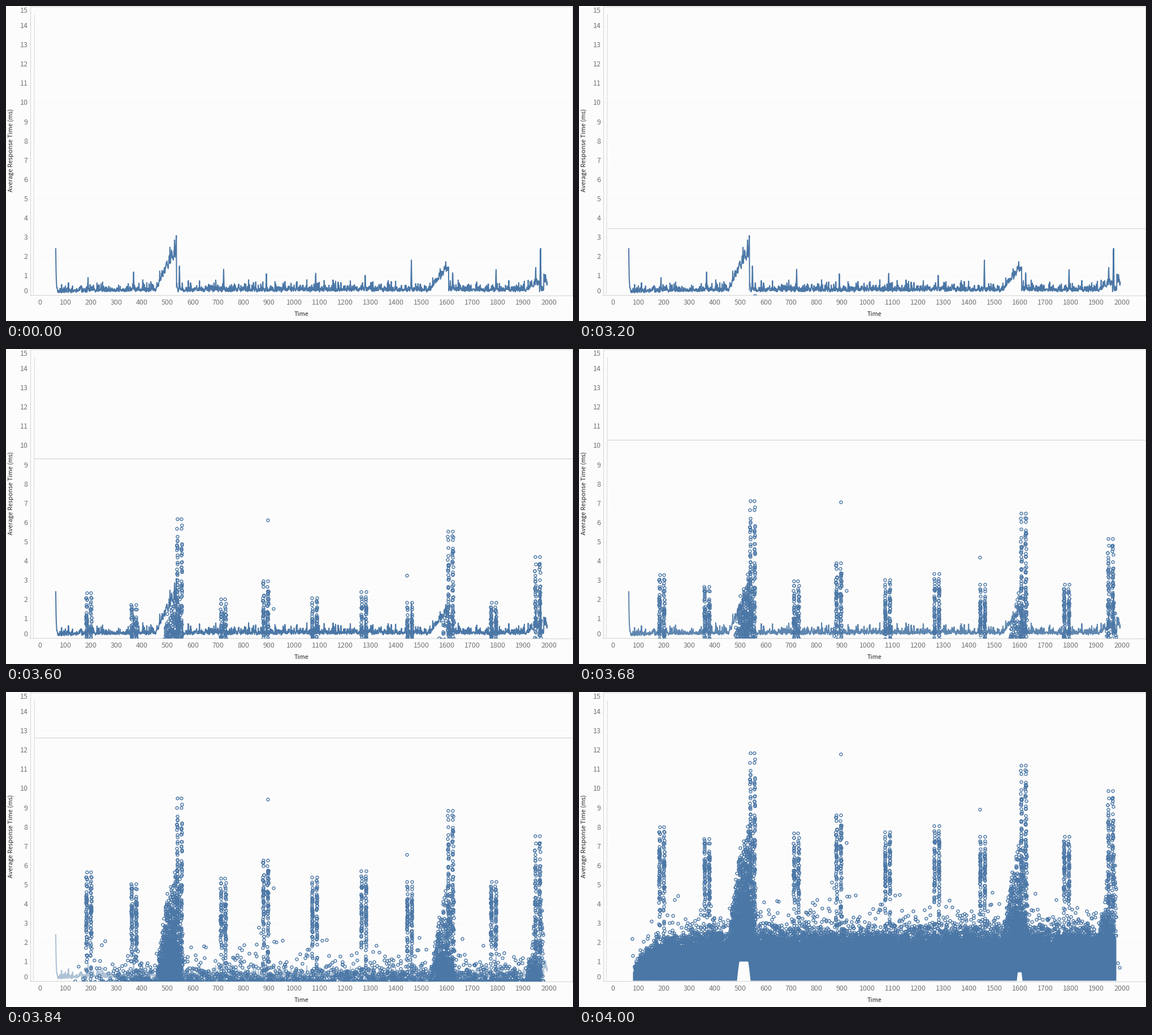
A matplotlib script that plays this animation: 1003x558 px, repeating every 7.04 s.

```python
import numpy as np
import matplotlib.pyplot as plt
from matplotlib.animation import FuncAnimation
from matplotlib.patches import Rectangle
from matplotlib.transforms import Affine2D

W, H, DPI = 1003, 558, 64
STEP, LOOP = 40, 7040
START = 2960 // STEP
BLUE = "#4b77a6"
RULE = "#d2d2d2"
ZERO, UNIT = 512.0, 34.12
LEFT, RIGHT, FOOT = 95, 950, 511
rng = np.random.default_rng(7)


def pt(px):
    return px * 72 / DPI


def ypx(value):
    return ZERO - UNIT * np.asarray(value)


def span(x, a, b):
    """Position of x between a and b, kept within 0..1."""
    return np.clip((x - a) / (b - a), 0, 1)


def settle(x, width):
    return 1 - np.exp(-(x - LEFT) / width)


fig = plt.figure(figsize=(W / DPI, H / DPI), dpi=DPI, facecolor="#fcfcfc")
ax = fig.add_axes([0, 0, 1, 1])
ax.set(xlim=(0, W), ylim=(H, 0))
ax.axis("off")


def rule(x, y, color=RULE, width=1, **kw):
    return ax.plot(x, y, color=color, lw=pt(width), **kw)[0]


def label(x, y, text, size=12.5, color="#757575", ha="center", **kw):
    ax.text(x, y, text, fontsize=pt(size), color=color, ha=ha, va="baseline",
            family="Noto Sans CJK JP", **kw)


# Axes
for v in range(16):
    y = float(ypx(v))
    if 0 < v < 15:
        rule([44, W], [y, y], "#f8f8f8")
    label(38.5, np.clip(y, 7.5, 504.5) + 4.6, str(v), ha="right")
for v in range(0, 2001, 100):
    label(60.3 + 0.45 * v, 529, str(v))
label(522.5, 549, "Time", 11, "#262626")
label(12.3, 255, "Average Response Time (ms)", 11, "#262626",
      rotation=90, rotation_mode="anchor")
rule([43.5, 43.5], [0, 513])
rule([43, W], [0.5, 0.5])
rule([1002.5, 1002.5], [0, 514])
rule([43, W], [512.5, 513.3])
rule([50.5, 48.5], [15, 510], "#d9d9d9")

# Bursts: x, top of the raw samples, peak of the average
bursts = [(142, 239, 1.05), (222, 260, 1.25), (302.5, 108, 1.65),
          (380, 250, 1.4), (455, 218, 1.1), (541.5, 248, 1.3),
          (628.5, 237, 1.25), (709.5, 256, 1.9), (782, 130, 1.4),
          (858, 256, 1.45), (936, 175, 2.95)]
# Surges: from, to, average level, body height, cloud height, samples
surges = [(264, 312, 2.0, 62, 195, 520), (748, 793, 1.1, 42, 185, 260),
          (918, 951, 0.4, 24, 170, 110)]

# Averaged series
sx = np.arange(88, 957.6, 0.45)
level = 0.17 - 0.09 * np.exp(-(sx - 88) / 50) + 2 * np.exp(-(sx - 88) / 0.9)
for a, b, high, *_ in surges:
    end = a + 0.78 * (b - a)
    level += np.where(sx < end, high * span(sx, a + 2, end) ** 0.8, 0)
level += np.where(sx > 951.5, 0.6 * np.exp(-(sx - 951.5) / 8), 0)
wobble = 1 + 0.18 * np.sin(1.1 * sx) * np.sin(0.37 * sx)
sv = level * wobble + np.minimum(rng.gamma(2, 0.08, sx.size), 0.6)
peaks = [(x + 3 + 0.65 * k, p) for k, (x, _, p) in enumerate(bursts)]
for x, p in peaks + [(290, 2.6), (298, 3.3), (778, 2.0), (937, 1.65)]:
    near = np.abs(sx - x)
    sv = np.maximum(sv, p * (1 - 0.9 * near))
series = rule(sx, ypx(sv), BLUE, 2, solid_joinstyle="round")


# Raw samples: solid body, ragged fringe, surge clouds, burst columns
def body_top(x):
    y = 494 - 54 * settle(x, 38) + 2 * np.sin(x / 9) * np.sin(x / 23)
    for a, b, _, high, *_ in surges:
        y = y - high * np.sin(np.pi * span(x, a, b) ** 1.3)
    return y


def body_foot(x):
    y = np.full(x.shape, float(FOOT))
    for a, b, high in [(279, 303, 34), (774, 784, 15)]:
        u = span(x, a, b)
        y -= high * np.minimum(1, 7 * u * (1 - u))
    return y


def above_body(count, scale):
    x = rng.uniform(LEFT + 2, RIGHT - 3, count)
    lift = rng.exponential(scale * (0.3 + 0.7 * settle(x, 60)))
    return np.c_[x, body_top(x) - lift]


dots = [above_body(3000, 11), above_body(330, 26)]
for a, b, _, _, high, count in surges:
    u = rng.beta(2, 1.3, count)
    x = a + (b - a) * u
    dots.append(np.c_[x, body_top(x) - high * u ** 0.7 * rng.beta(1, 1.6, count)])
for x, top, _ in bursts:
    for side in (0, 8):
        u = np.r_[rng.beta(2.2, 2.0, 50), 0.94, 1]
        cy = np.r_[385 - (385 - top) * u, rng.uniform(365, 440, 10)]
        dots.append(np.c_[x + side + rng.uniform(-1, 1, cy.size), cy])
dots.append([(94, 437), (95, 467), (463.5, 110), (709.5, 208),
             (953, 480), (956, 488)])
dots = np.vstack(dots)

shift = Affine2D()
moving = shift + ax.transData
window = Rectangle((43, 0), W - 43, 512, transform=ax.transData)
bx = np.arange(LEFT, RIGHT + 0.5, 0.5)
body = ax.fill_between(bx, body_top(bx), body_foot(bx), color=BLUE, lw=0,
                       transform=moving, zorder=3)
rings = ax.plot(dots[:, 0], dots[:, 1], "o", ms=pt(5), mew=pt(1.4), mfc="none",
                mec=BLUE, transform=moving, zorder=4)[0]
edge = rule([50, W], [0.5, 0.5], "#cfcfcf", transform=moving, zorder=2.5)
ax.set(xlim=(0, W), ylim=(H, 0))
layer = (body, rings, edge)
for part in layer:
    part.set_clip_path(window)

# Steady slide with a short hitch where the fade sets in
slide_n, slide_y = zip((0, 507), (1, 493.5), (16, 193), (17, 181), (24, 40),
                       (26, 0))


def update(i):
    n = i - START
    shift.clear().translate(0, np.interp(n, slide_n, slide_y))
    for part in layer:
        part.set_visible(n >= 0)
    series.set_alpha(float(np.clip(1 - (n - 17) / 9, 0, 1)))
    return (series, *layer)


anim = FuncAnimation(fig, update, frames=LOOP // STEP, interval=STEP,
                     repeat=True, repeat_delay=0, blit=False)
plt.show()
```
